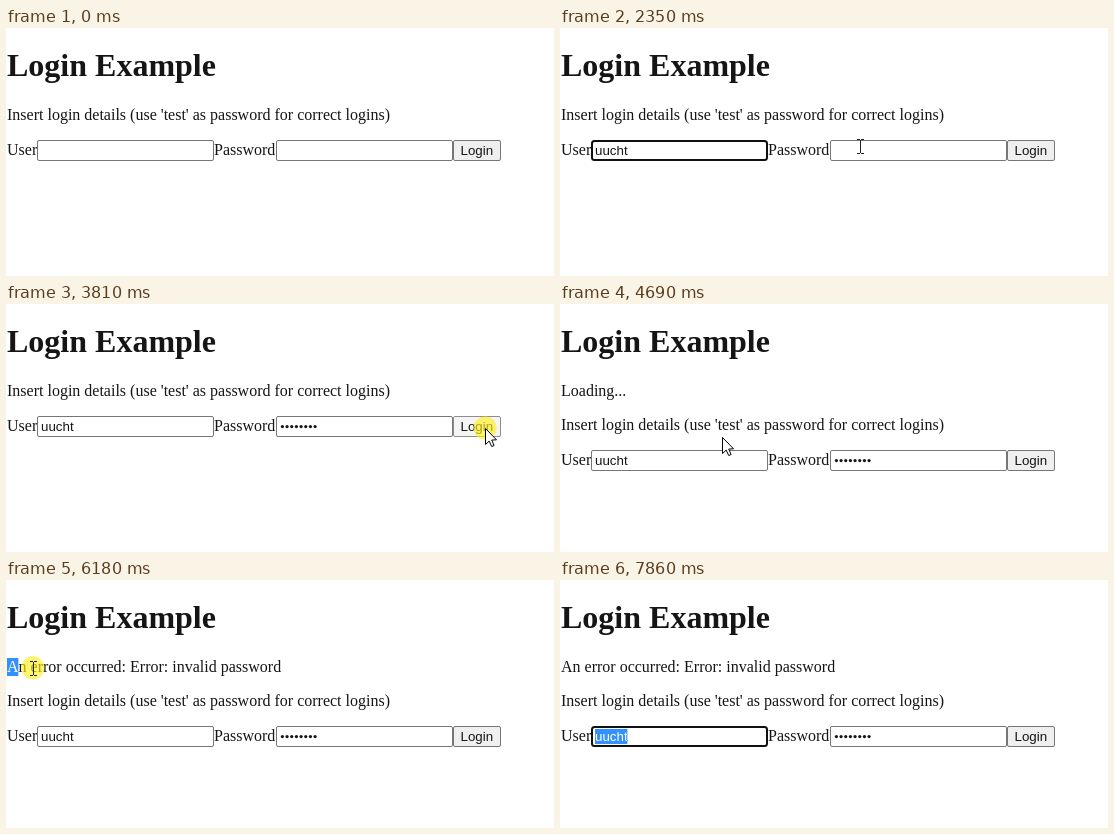
Write an HTML page with a canvas that moves like this. It is 548 px wide and 248 px high and loops after 8000 ms.

```html
<!DOCTYPE html>
<html lang="en">
<head>
<meta charset="utf-8">
<title>Login Example</title>
<style>
html, body { margin: 0; width: 100%; height: 100%; overflow: hidden; background: #fff; }
canvas { display: block; }
</style>
</head>
<body>
<canvas id="stage" width="548" height="248"></canvas>
<script>
const ctx = document.getElementById('stage').getContext('2d');
const LOOP = 8000;
const MS_PER_PIXEL = 1.4;
const PRESS_DELAY = 140;
const SERIF = '16px "Liberation Serif", serif';
const TITLE = 'bold 32px "Liberation Serif", serif';
const SANS = '13.333px "Liberation Sans", sans-serif';
const INK = '#151515';
const BLUE = '#3390ff';
const USER = 'uucht';
const HINT = "Insert login details (use 'test' as password for correct logins)";
const ERROR = 'An error occurred: Error: invalid password';
const LOADING_AT = 3940, ERROR_AT = 4960;
const ARROW = new Path2D('M0 0V16L3.7 12.6L6.2 18L8.6 17L6.2 11.6L11 11.3Z');

// Where the pointer goes, when it arrives, and when a press made there ends
const stops = [
  { x: 379, y: 215, at: 200 },
  { x: 140, y: 114, at: 610, release: 880 },
  { x: 300, y: 118, at: 2020 },
  { x: 309, y: 114, at: 2370, release: 2780 },
  { x: 479, y: 124, at: 3470, release: 3870 },
  { x: 162, y: 133, at: 4690 },
  { x: 3, y: 88, at: 5710, release: 6860 },
  { x: 316, y: 86, at: 6545 },
  { x: 158, y: 184, at: 7110, release: 7390 },
  { x: 69, y: 157, at: 7600, release: 7840 },
  { x: 34, y: 157, at: 7800 }
];
const clicks = stops.filter(s => s.release)
  .map(s => ({ down: s.at + PRESS_DELAY, up: s.release }));
const [userClick, passwordClick, loginClick, textDrag, blankClick, userDrag] = clicks;

const within = (v, a, b) => v >= a && v < b;
const inBox = (p, x, y, w, h) => within(p.x, x, x + w) && within(p.y, y, y + h);
const clamp = (v, low, high) => Math.min(high, Math.max(low, v));
const typedCount = (t, start, gap, most) => clamp(Math.floor((t - start) / gap) + 1, 0, most);

// Each move takes time in proportion to its length
function pointerAt(t) {
  let { x, y } = stops[0];
  for (const stop of stops.slice(1)) {
    const dx = stop.x - x, dy = stop.y - y;
    const duration = Math.hypot(dx, dy) * MS_PER_PIXEL;
    const p = clamp(1 + (t - stop.at) / duration, 0, 1);
    const eased = p * p * (3 - 2 * p);
    x += dx * eased;
    y += dy * eased;
    if (p < 1) break;
  }
  return { x, y };
}

function text(str, x, y, font = SERIF, color = INK) {
  ctx.font = font;
  ctx.fillStyle = color;
  ctx.fillText(str, x, y);
}

function box(x, y, w, h, fill, stroke, line = 1) {
  ctx.beginPath();
  ctx.roundRect(x + line / 2, y + line / 2, w - line, h - line, line + 0.5);
  ctx.fillStyle = fill;
  ctx.fill();
  ctx.strokeStyle = stroke;
  ctx.lineWidth = line;
  ctx.stroke();
}

function field(x, y, focused) {
  box(x, y, 177, 21, '#fff', focused ? '#101010' : '#767676', focused ? 2 : 1);
}

// Text whose part between two x positions is selected
function selectedText(str, x, y, font, from, to, top, height) {
  text(str, x, y, font);
  if (to <= from) return;
  ctx.save();
  ctx.beginPath();
  ctx.rect(from, top, to - from, height);
  ctx.clip();
  ctx.fillStyle = BLUE;
  ctx.fillRect(from, top, to - from, height);
  text(str, x, y, font, '#fff');
  ctx.restore();
}

// The letter edge nearest to a pointer position
function snap(str, font, x, target) {
  ctx.font = font;
  let best = x;
  for (let n = 1; n <= str.length; n++) {
    const edge = x + ctx.measureText(str.slice(0, n)).width;
    if (Math.abs(edge - target) < Math.abs(best - target)) best = edge;
  }
  return best;
}

function disc(x, y, radius, color) {
  ctx.fillStyle = color;
  ctx.beginPath();
  ctx.arc(x, y, radius, 0, Math.PI * 2);
  ctx.fill();
}

function arrow(x, y) {
  ctx.save();
  ctx.translate(Math.round(x) + 0.5, Math.round(y) + 0.5);
  ctx.fillStyle = '#fff';
  ctx.fill(ARROW);
  ctx.strokeStyle = '#000';
  ctx.lineWidth = 1;
  ctx.stroke(ARROW);
  ctx.restore();
}

function beam(x, y) {
  x = Math.round(x);
  y = Math.round(y);
  ctx.fillStyle = '#222';
  ctx.fillRect(x, y - 6, 1, 13);
  for (const edge of [y - 7, y + 7]) {
    ctx.fillRect(x - 3, edge, 3, 1);
    ctx.fillRect(x + 1, edge, 3, 1);
  }
}

function drawStatus(t, status) {
  const selecting = within(t, textDrag.down, blankClick.up);
  const end = selecting ? snap(status, SERIF, 1, pointerAt(Math.min(t, textDrag.up) - 20).x) : 1;
  selectedText(status, 1, 92, SERIF, 1, end, 78, 18);
}

function drawForm(t, top, pointer, pressed) {
  const base = top + 15;
  text('User', 1, base);
  text('Password', 208, base);
  field(31, top, within(t, userClick.down, passwordClick.down) || t >= userDrag.down);
  field(270, top, within(t, passwordClick.down, loginClick.down));

  const typed = USER.slice(0, typedCount(t, 1410, 100, USER.length));
  ctx.font = SANS;
  const end = 35 + ctx.measureText(typed).width;
  const start = t >= userDrag.down ? snap(USER, SANS, 35, pointer.x) : end;
  selectedText(typed, 35, base, SANS, start, end, top + 3, 15);
  if (within(t, 1280, 1760)) {
    ctx.fillStyle = INK;
    ctx.fillRect(Math.round(end), top + 3, 1, 15);
  }
  const dots = typedCount(t, 3010, 33, 8);
  for (let i = 0; i < dots; i++) disc(276.4 + i * 4.67, top + 10.6, 1.6, INK);

  const hover = t >= stops[0].at && inBox(pointer, 447, top, 48, 21);
  const face = !hover ? '#efefef' : pressed ? '#f5f5f5' : '#e5e5e5';
  const edge = !hover ? '#767676' : pressed ? '#8d8d8d' : '#4f4f4f';
  box(447, top, 48, 21, face, edge);
  text('Login', 454.5, base, SANS);
}

function draw(t) {
  const pointer = pointerAt(t);
  const pressed = clicks.some(c => within(t, c.down, c.up));
  const status = t < LOADING_AT ? '' : t < ERROR_AT ? 'Loading...' : ERROR;
  const shift = status ? 34 : 0;
  const top = 112 + shift;

  ctx.fillStyle = '#fff';
  ctx.fillRect(0, 0, 548, 248);
  text('Login Example', 1, 48, TITLE);
  drawStatus(t, status);
  text(HINT, 1, 92 + shift);
  drawForm(t, top, pointer, pressed);

  if (!within(t, stops[0].at, userDrag.up)) return;
  if (pressed) disc(pointer.x, pointer.y, 11.5, 'rgba(255, 240, 30, 0.65)');
  const overText = inBox(pointer, 0, 78 + shift, 384, 18) ||
    inBox(pointer, 0, top, 447, 21) ||
    (status === ERROR && inBox(pointer, 0, 78, 276, 18));
  (overText ? beam : arrow)(pointer.x, pointer.y);
}

const begin = performance.now();
function frame() {
  draw((performance.now() - begin) % LOOP);
  requestAnimationFrame(frame);
}
frame();
</script>
</body>
</html>
```
